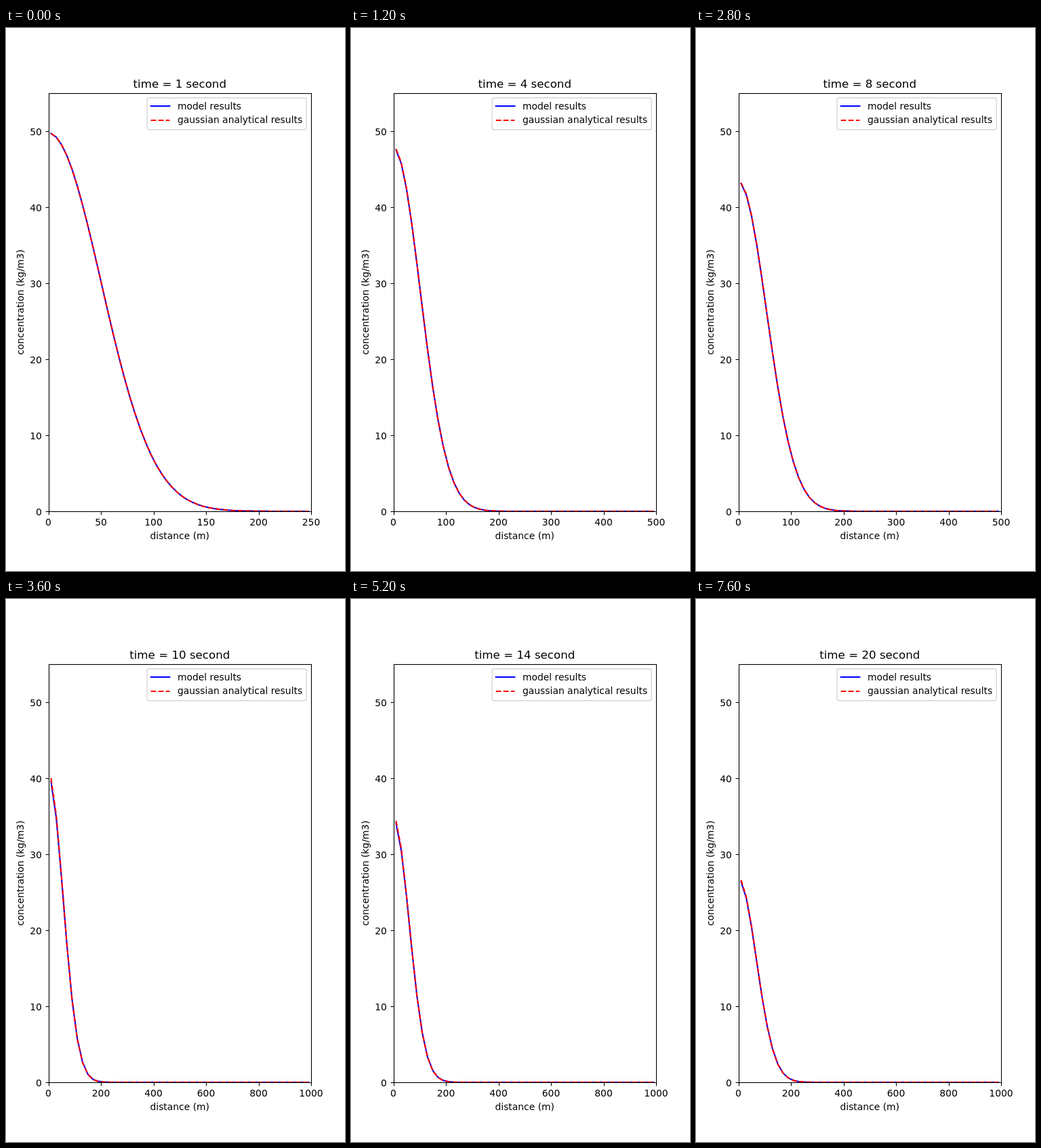
An HTML page with a canvas that plays this animation: 500x800 px, repeating every 8000 ms.

```html
<!DOCTYPE html>
<html lang="en">
<head>
<meta charset="utf-8">
<title>Concentration over distance</title>
<style>
html, body { margin: 0; width: 100%; height: 100%; overflow: hidden; background: #fff; }
canvas { display: block; width: 500px; height: 800px; }
</style>
</head>
<body>
<canvas id="plot"></canvas>
<script>
const W = 500, H = 800;
const LEFT = 62.5, RIGHT = 450, TOP = 96, BOTTOM = 712;
const Y_MAX = 55, CELLS = 50;
const STEP_MS = 400, STEPS = 20;
const LINE = 1.5 * 100 / 72, THIN = 0.8 * 100 / 72;
const DASH = [3.7 * LINE, 1.6 * LINE];
const BLUE = '#00f', RED = '#f00';

const canvas = document.getElementById('plot');
const ctx = canvas.getContext('2d');
const dpr = window.devicePixelRatio || 1;
canvas.width = W * dpr;
canvas.height = H * dpr;

const snap = v => Math.floor(v + 0.5) + 0.5;
const yPos = c => BOTTOM - c * (BOTTOM - TOP) / Y_MAX;
const range = step => step < 3 ? 250 : step < 10 ? 500 : 1000;

// Spreading puff: the peak falls as the variance grows.
const variance = step => 2500 + 7.4 * step + 5 * step * step;
const puff = (x, s2) => 50 * 2500 / s2 * Math.exp(-x * x / (2 * s2));

function text(str, x, y, align = 'center', size = 10) {
  ctx.font = `${size * 100 / 72}px "DejaVu Sans", sans-serif`;
  ctx.textAlign = align;
  ctx.fillStyle = '#000';
  ctx.fillText(str, x, y);
}

function stroke(points, color, width, dash = [], cap = 'butt') {
  ctx.beginPath();
  points.forEach(([x, y]) => ctx.lineTo(x, y));
  ctx.strokeStyle = color;
  ctx.lineWidth = width;
  ctx.lineCap = cap;
  ctx.lineJoin = 'round';
  ctx.setLineDash(dash);
  ctx.stroke();
}

function curves(step, xMax) {
  const dx = xMax / CELLS;
  const s2 = variance(step);
  // Regridding onto coarser cells widens the model slightly.
  const spread = (dx * dx - 25) / 10;
  const trace = v => Array.from({ length: CELLS }, (_, i) => {
    const x = (i + 0.5) * dx;
    return [LEFT + x / xMax * (RIGHT - LEFT), yPos(puff(x, v))];
  });
  ctx.save();
  ctx.beginPath();
  ctx.rect(63, TOP, RIGHT - 63, BOTTOM - TOP);
  ctx.clip();
  stroke(trace(s2 + spread), BLUE, LINE, [], 'square');
  stroke(trace(s2), RED, LINE, DASH);
  ctx.restore();
}

function axes(xMax) {
  const l = snap(LEFT), r = snap(RIGHT), t = snap(TOP), b = snap(BOTTOM);
  for (let i = 0; i <= 5; i++) {
    const x = LEFT + i * (RIGHT - LEFT) / 5;
    stroke([[snap(x), b], [snap(x), b + 5]], '#000', THIN);
    text(i * xMax / 5, x, 733);

    const y = yPos(i * 10);
    stroke([[l, snap(y)], [l - 5, snap(y)]], '#000', THIN);
    text(i * 10, 52.8, Math.round(y) + 6, 'right');
  }
  ctx.setLineDash([]);
  ctx.lineJoin = 'miter';
  ctx.strokeRect(l, t, r - l, b - t);

  text('distance (m)', 256.25, 753);
  ctx.save();
  ctx.translate(26, 404);
  ctx.rotate(-Math.PI / 2);
  text('concentration (kg/m3)', 0, 0);
  ctx.restore();
}

function legend() {
  ctx.beginPath();
  ctx.roundRect(208.1, 103, 235, 46.7, 2.8);
  ctx.fillStyle = '#fff';
  ctx.fill();
  ctx.setLineDash([]);
  ctx.strokeStyle = 'rgba(204, 204, 204, 0.8)';
  ctx.lineWidth = 100 / 72;
  ctx.stroke();

  stroke([[213.7, 115], [241.4, 115]], BLUE, LINE, [], 'square');
  stroke([[213.7, 136], [241.4, 136]], RED, LINE, DASH);
  text('model results', 253, 120, 'left');
  text('gaussian analytical results', 253, 140, 'left');
}

function draw(step) {
  const xMax = range(step);
  ctx.setTransform(dpr, 0, 0, dpr, 0, 0);
  ctx.fillStyle = '#fff';
  ctx.fillRect(0, 0, W, H);
  curves(step, xMax);
  axes(xMax);
  text(`time = ${step} second`, 256.25, 88, 'center', 12);
  legend();
}

function tick() {
  draw(Math.floor(performance.now() / STEP_MS) % STEPS + 1);
  requestAnimationFrame(tick);
}
tick();
</script>
</body>
</html>
```
